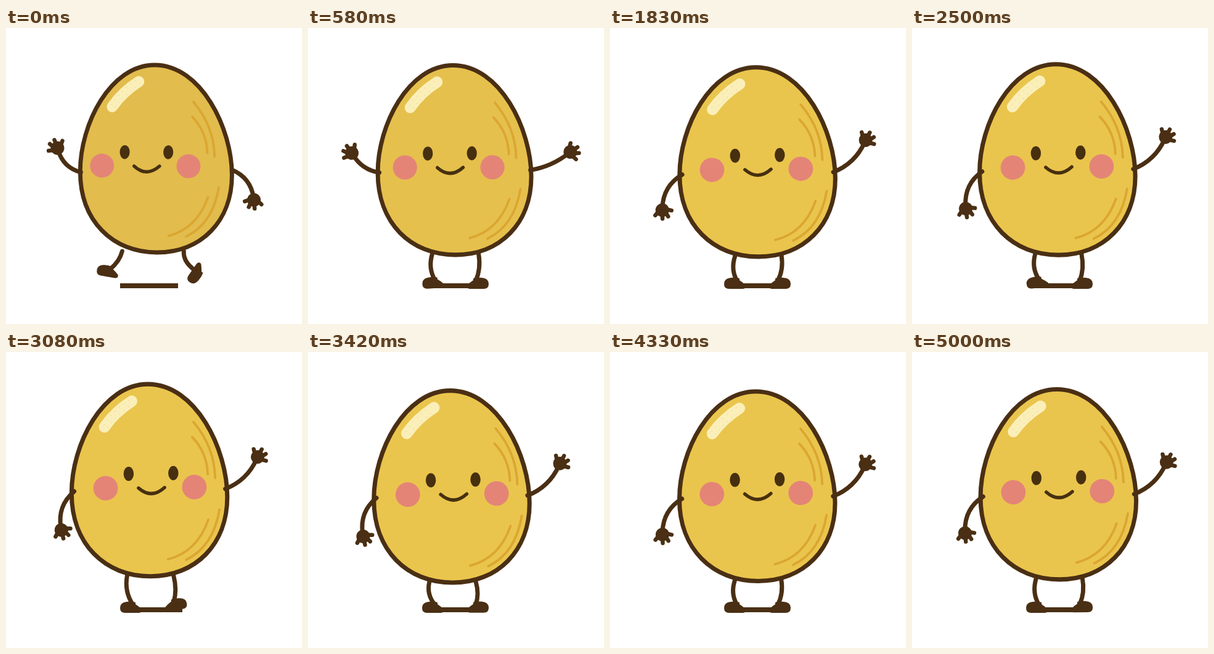
These frames come from a looping animation (480 px wide and 480 px high, 5.08 s). An HTML page:

```html
<!DOCTYPE html>
<html lang="en">
<head>
<meta charset="utf-8">
<title>Waving egg</title>
<style>
  html, body { margin: 0; width: 100%; height: 100%; overflow: hidden; background: #fff; }
  svg { display: block; width: 100vw; height: 100vh; }
  .ink { fill: none; stroke: #4a2f14; stroke-width: 7; stroke-linecap: round; stroke-linejoin: round; }
  .solid { fill: #4a2f14; }
  .crease { fill: none; stroke: #dba631; stroke-width: 3.8; stroke-linecap: round; }
  .shine { fill: none; stroke: #fbefb9; stroke-width: 18; stroke-linecap: round; }
  .specks { fill: none; stroke: #ead28a; stroke-width: 1.3; stroke-dasharray: 1.3 8; }
  .cheek { fill: #e48477; }
  .eye { fill: #47300f; }
  .smile { fill: none; stroke: #47300f; stroke-width: 5.4; stroke-linecap: round; }
</style>
</head>
<body>
<svg viewBox="0 0 480 480">
  <defs>
    <g id="hand">
      <ellipse class="solid" cx="4" rx="11" ry="11"/>
      <path class="ink" style="stroke-width:6.5" d="M2 4L4 15M5 4L14 10M6 0L18 1M4 -4L13 -11"/>
    </g>
    <path id="foot" class="solid" d="M-4 -4Q3 -6 10 -5Q21 -4 21 5Q21 13 13 13L-10 13Q-16 12 -14 7Q-10 3 -4 -1Z"/>
  </defs>

  <path id="ground" class="ink" style="stroke-width:8;stroke-linecap:butt"/>
  <path id="legL" class="ink"/>
  <path id="legR" class="ink"/>
  <use id="footL" href="#foot"/>
  <use id="footR" href="#foot"/>

  <g id="body">
    <path id="shell" class="ink" d="M234 64C161 64 111 160 111 237C111 318 165 369 238 369C311 369 362 318 362 243C362 167 311 64 234 64Z"/>
    <path class="shine" d="M164 132Q181 108 208 91"/>
    <path class="specks" d="M163 129Q178 105 206 88M169 133Q184 113 210 95"/>
    <g id="creases">
      <path class="crease" d="M306 124Q340 164 341 213M304 148Q328 173 329 207"/>
      <path class="crease" d="M348 263Q338 322 294 343M330 279Q312 330 265 342"/>
    </g>
    <g id="face">
      <ellipse class="cheek" cx="163" cy="229.5" rx="19.8" ry="19.5"/>
      <ellipse class="cheek" cx="306" cy="227" rx="19.8" ry="19.5"/>
      <ellipse class="eye" cx="200" cy="206.5" rx="8.2" ry="11.3"/>
      <ellipse class="eye" cx="272" cy="205" rx="8.2" ry="11.3"/>
      <path class="smile" d="M216 229Q237 247 258 228"/>
    </g>
  </g>

  <path id="armL" class="ink"/>
  <path id="armR" class="ink"/>
  <use id="handL" href="#hand"/>
  <use id="handR" href="#hand"/>
</svg>
<script>
const LOOP = 5080, LAST = 60, STEP = 250 / 3;
const BOB = 820, LOW = 4330, SWAY = 2700;
const $ = id => document.getElementById(id);
const set = (id, name, value) => $(id).setAttribute(name, value);
const mix = (a, b, k) => a + (b - a) * k;
const wave = turns => Math.cos(2 * Math.PI * turns);
const frameStart = i => Math.round(i * STEP / 10) * 10;

// Eased 0..1 between two times
function ramp(t, from, to) {
  const k = Math.min(1, Math.max(0, (t - from) / (to - from)));
  return (1 - Math.cos(Math.PI * k)) / 2;
}

// side: -1 left, 1 right; the angle counts upward from horizontal
function drawArm(name, side, x, y, angle, reach) {
  const a = angle * Math.PI / 180, bend = 18 * Math.sin(a * 1.2);
  const hx = x + side * reach * Math.cos(a), hy = y - reach * Math.sin(a);
  const cx = (x + hx) / 2 + side * bend * Math.sin(a), cy = (y + hy) / 2 + bend * Math.cos(a);
  const turn = Math.atan2(hy - cy, side * (hx - cx)) * 180 / Math.PI;
  set('arm' + name, 'd', `M${x} ${y}Q${cx} ${cy} ${hx} ${hy}`);
  set('hand' + name, 'transform', `translate(${hx} ${hy}) scale(${side} 1) rotate(${turn})`);
}

function drawLeg(name, side, hipX, hipY, x, y, turn, bow) {
  const knee = mix(hipX, x, .4) + side * bow;
  set('leg' + name, 'd', `M${hipX} ${hipY}Q${knee} ${mix(hipY, y, .55)} ${x} ${y}`);
  set('foot' + name, 'transform', `translate(${x} ${y}) scale(${side} 1) rotate(${turn})`);
}

function draw(t) {
  const stand = ramp(t, 0, 500);    // stride comes to rest
  const front = ramp(t, 0, 1250);   // body turns to face us
  const drop = ramp(t, 1250, 1830); // left arm goes down
  const raise = ramp(t, 0, 830);    // right arm goes up
  const sway = wave((t - 1830) / SWAY);
  const beat = (t - LOW) / BOB - mix(.244, 0, drop);

  const cx = 235.8 + 3.3 * sway + mix(9, 0, front);
  const top = mix(57, 55 + 6 * wave(beat), stand);
  const w = mix(252, 258.5, front), h = mix(310, 315.5 - 2.3 * sway, front);
  const shift = mix(-15.5, 1.7 - 1.3 * sway, front);
  set('body', 'transform', `translate(${cx} ${top}) scale(${w / 257} ${h / 311}) translate(-236.5 -61)`);
  set('face', 'transform', `translate(${shift} 0) rotate(${mix(1.4, .3, front)} 236 215)`);
  set('creases', 'transform', `translate(${shift / 2} 0)`);
  $('shell').style.fill = `hsl(${mix(44.5, 46, front)} ${mix(72, 79, front)}% ${mix(59.5, 61, front)}%)`;

  drawArm('L', -1, cx - 122, top + 177,
    mix(mix(44, 21, front), -64.5 + 5.5 * sway, drop), mix(51, 62.5, drop));
  drawArm('R', 1, cx + 123, top + 173, mix(-52, 43.5, raise), mix(57, 70, raise));

  // Feet lift in turn, one at each upward bob
  const step = wave((beat - .5) / 2 + .75 * 2);
  const lift = k => stand * Math.max(0, k) ** 3;
  const liftL = lift(step), liftR = lift(-step), hipY = top + h - 5;
  drawLeg('L', -1, cx + mix(-55, -36, stand), hipY,
    mix(169, 206, stand), mix(391, 410, stand) - 7 * liftL, mix(-10, 0, stand) + 25 * liftL, mix(-4, 9, stand));
  drawLeg('R', 1, cx + mix(45, 39, stand), hipY,
    mix(314, 272, stand), mix(398, 410, stand) - 5 * liftR, mix(125, 0, stand) - 5 * liftR, mix(-12, 6, stand));
  set('ground', 'd', `M${mix(185, 192, stand)} 418H${mix(279, 286, stand)}`);
}

function tick(now) {
  const t = now % LOOP;
  let i = LAST;
  while (frameStart(i) > t) i--;
  draw(frameStart(i));
  requestAnimationFrame(tick);
}
draw(0);
requestAnimationFrame(tick);
</script>
</body>
</html>
```
